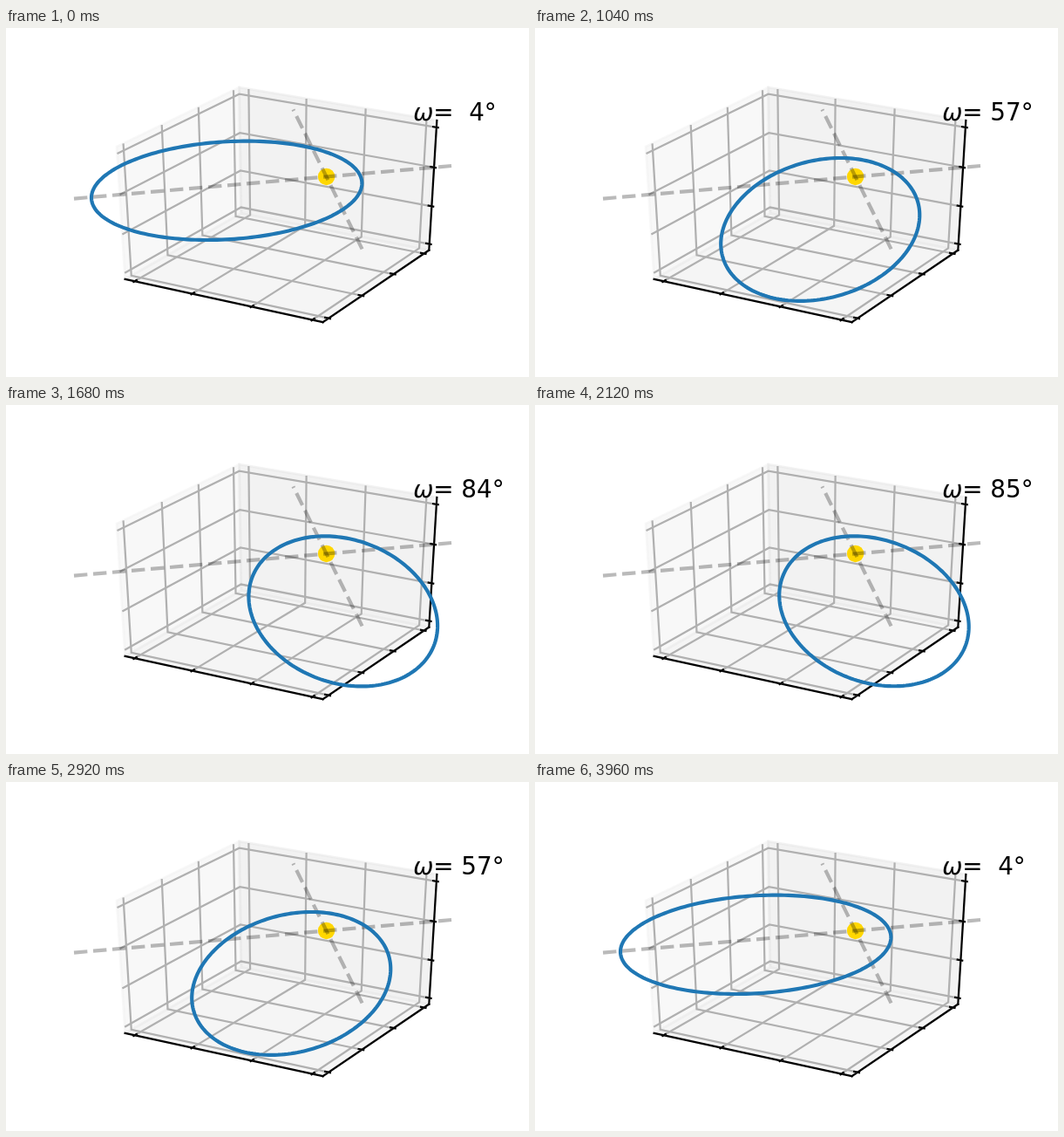
Animation, 600 px wide and 400 px high, one loop 4 s. Source, as an HTML page with a canvas:

```html
<!DOCTYPE html>
<html lang="en">
<head>
<meta charset="utf-8">
<title>Argument of periapsis</title>
<style>
html, body { margin: 0; width: 100%; height: 100%; overflow: hidden; background: #fff; }
canvas { display: block; }
</style>
</head>
<body>
<canvas id="stage" width="600" height="400"></canvas>
<script>
const ctx = document.getElementById('stage').getContext('2d');
const PT = 200 / 72;            // pixels per point
const STEP = 40, FRAMES = 100;
const HALF = 25 / 48;           // half the box, in view units
const UNIT = 1 / 3.2;           // one data unit
const TICKS = [-1.5, -0.5, 0.5, 1.5].map(k => k * UNIT);
const rad = deg => deg * Math.PI / 180;

// Camera basis
const AZ = rad(-60), EL = rad(30), DIST = 10;
const RIGHT = [-Math.sin(AZ), Math.cos(AZ), 0];
const UP = [-Math.sin(EL) * Math.cos(AZ), -Math.sin(EL) * Math.sin(AZ), Math.cos(EL)];
const TOWARD = [Math.cos(EL) * Math.cos(AZ), Math.cos(EL) * Math.sin(AZ), Math.sin(EL)];

const dot = (a, b) => a[0] * b[0] + a[1] * b[1] + a[2] * b[2];
const add = (p, v, k) => p.map((c, i) => c + v[i] * k);

function project(p) {
  const w = DIST - dot(p, TOWARD);
  return [
    75 + (dot(p, RIGHT) / w + 0.095) * 465 / 0.185,
    356 - (dot(p, UP) / w + 0.095) * 308 / 0.185
  ];
}

// Orbit: the node line and the direction a quarter turn further on
const SUN = [UNIT / 2, UNIT / 2, UNIT / 2];
const INC = rad(22.5), ECC = 0.75, A = 2 * UNIT, B = A * Math.sqrt(1 - ECC * ECC);
const NODE = [Math.SQRT1_2, Math.SQRT1_2, 0];
const SIDE = [-Math.SQRT1_2 * Math.cos(INC), Math.SQRT1_2 * Math.cos(INC), Math.sin(INC)];

function trace(points, closed) {
  ctx.beginPath();
  points.forEach(p => ctx.lineTo(...project(p)));
  if (closed) ctx.closePath();
}

function line(points, color, pt, cap = 'butt', closed = false) {
  trace(points, closed);
  ctx.strokeStyle = color;
  ctx.lineWidth = pt * PT;
  ctx.lineCap = cap;
  ctx.stroke();
}

function pane(corners, level) {
  const v = Math.round(level * 255);
  const color = `rgba(${v},${v},${v},0.5)`;
  trace(corners, true);
  ctx.fillStyle = color;
  ctx.fill();
  line(corners, color, 1, 'butt', true);
}

function axis(edge, gridAt, tickAt, tickDir) {
  line(edge, '#000', 0.8, 'square');
  TICKS.forEach(s => line(gridAt(s), '#b0b0b0', 0.8));
  TICKS.forEach(s => {
    const p = tickAt(s);
    line([add(p, tickDir, 0.1 / 12), add(p, tickDir, -0.2 / 12)], '#000', 0.8, 'square');
  });
}

function drawBox() {
  const h = HALF;
  pane([[-h, -h, -h], [-h, h, -h], [-h, h, h], [-h, -h, h]], 0.95);
  pane([[-h, h, -h], [h, h, -h], [h, h, h], [-h, h, h]], 0.9);
  pane([[-h, -h, -h], [h, -h, -h], [h, h, -h], [-h, h, -h]], 0.925);
  axis([[-h, -h, -h], [h, -h, -h]],
    s => [[s, h, h], [s, h, -h], [s, -h, -h]], s => [s, -h, -h], [0, -1, 0]);
  axis([[h, -h, -h], [h, h, -h]],
    s => [[-h, s, h], [-h, s, -h], [h, s, -h]], s => [h, s, -h], [1, 0, 0]);
  axis([[h, h, -h], [h, h, h]],
    s => [[-h, -h, s], [-h, h, s], [h, h, s]], s => [h, h, s], [1, 0, 0]);
}

function drawSun() {
  ctx.beginPath();
  ctx.arc(...project(SUN), 3.5 * PT, 0, 2 * Math.PI);
  ctx.fillStyle = '#ffd700';
  ctx.fill();
}

function drawGuides() {
  const color = 'rgba(0,0,0,0.27)';
  ctx.setLineDash([5.55 * PT, 2.4 * PT]);
  line([add(SUN, NODE, -1.164), add(SUN, NODE, 0.6)], color, 1.5);
  line([add(SUN, SIDE, -0.623), add(SUN, SIDE, 0.623)], color, 1.5);
  ctx.setLineDash([]);
}

function drawOrbit(omega) {
  const c = Math.cos(omega), s = Math.sin(omega), n = 200;
  const P = add(NODE.map(v => v * c), SIDE, s);
  const Q = add(SIDE.map(v => v * c), NODE, -s);
  const points = Array.from({ length: n }, (_, i) => {
    const E = 2 * Math.PI * i / n;
    return add(add(SUN, P, A * (Math.cos(E) - ECC)), Q, B * Math.sin(E));
  });
  line(points, '#1f77b4', 1.5, 'butt', true);
}

function drawLabel(deg) {
  const size = 10 * PT, base = 106;
  ctx.fillStyle = '#000';
  ctx.font = `${size}px "DejaVu Sans", sans-serif`;
  ctx.save();
  ctx.transform(1, 0, -0.194, 1, 465.7, base);   // slanted omega
  ctx.fillText('ω', 0, 0);
  ctx.restore();
  ctx.fillText('=' + String(Math.round(deg)).padStart(3) + '°', 467 + 0.837 * size, base);
}

// Arctangent sweep, forward then mirrored
function omegaAt(ms) {
  const frame = Math.floor(ms / STEP) % FRAMES;
  const k = Math.min(frame, FRAMES - 1 - frame);
  return 45 + 90 / Math.PI * Math.atan(-7 + 14 * k / 49);
}

function draw(ms) {
  const deg = omegaAt(ms);
  ctx.fillStyle = '#fff';
  ctx.fillRect(0, 0, 600, 400);
  drawBox();
  drawSun();
  drawGuides();
  drawOrbit(rad(deg));
  drawLabel(deg);
}

let start = null;
function tick(now) {
  if (start === null) start = now;
  draw(Math.max(0, now - start));
  requestAnimationFrame(tick);
}
draw(0);
requestAnimationFrame(tick);
</script>
</body>
</html>
```
